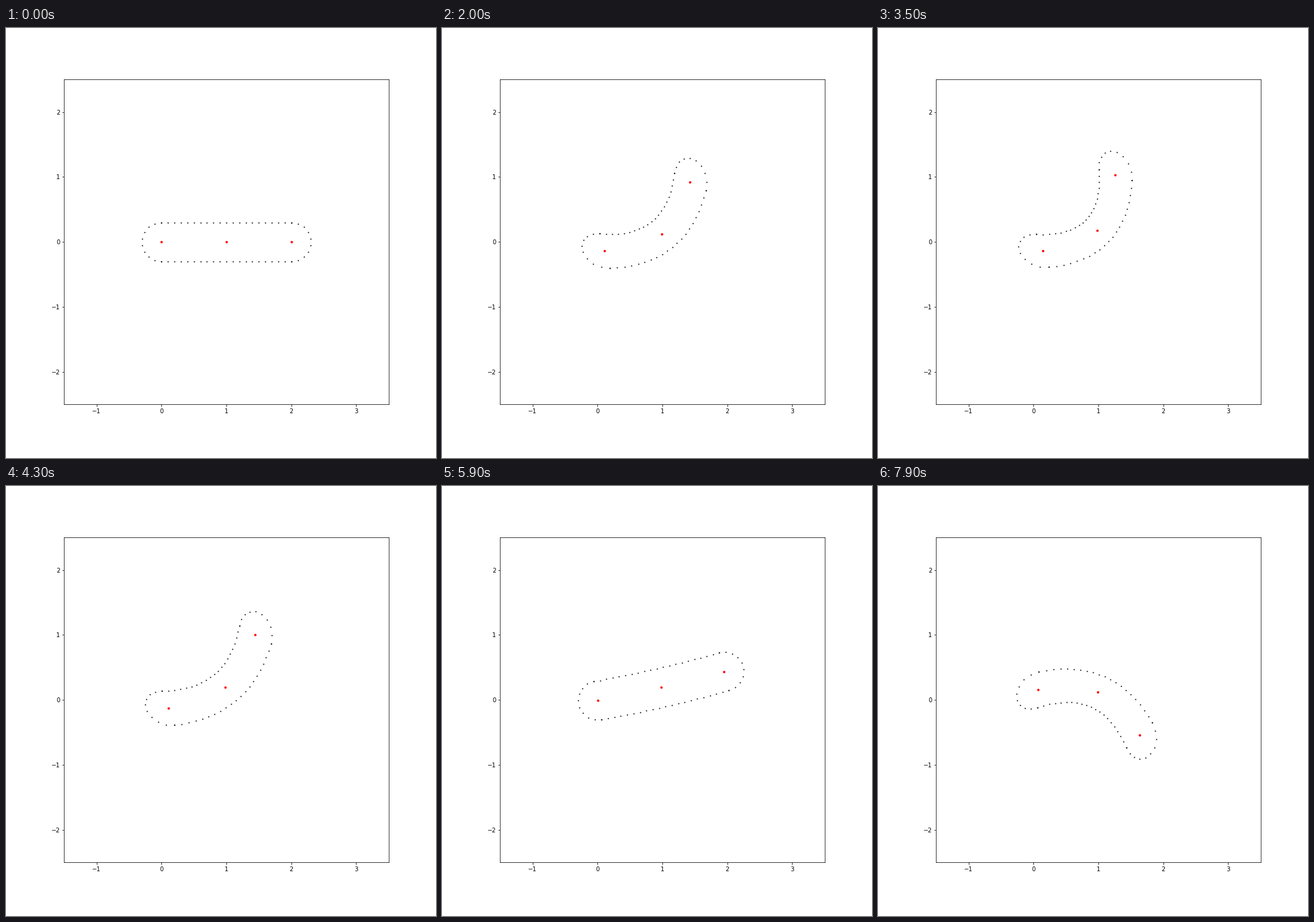
A matplotlib script for the animation above (8000 ms loop, 720 by 720 pixels).

```python
import numpy as np
import matplotlib.pyplot as plt
from matplotlib.animation import FuncAnimation

FRAMES = 80
INTERVAL = 100
RADIUS = 0.3

fig = plt.figure(figsize=(10, 10), dpi=72, facecolor="white")
ax = fig.add_axes([0.135, 0.125, 0.755, 0.755])
ax.set_xlim(-1.5, 3.5)
ax.set_ylim(-2.5, 2.5)
ax.set_xticks(range(-1, 4))
ax.set_yticks(range(-2, 3))


def capsule():
    """Rest outline as complex numbers: two sides and two round caps."""
    side = np.linspace(0, 2, 21)
    cap = RADIUS * np.exp(1j * np.linspace(np.pi / 2, 3 * np.pi / 2, 10))
    return np.concatenate([side + 1j * RADIUS, side - 1j * RADIUS, cap, 2 - cap])


def bend(z, shoulder, elbow):
    """Linear blend skinning: root joint at 0, second joint at 1."""
    weight = (z.real + 0.5) / 3
    return np.exp(1j * shoulder) * (z + weight * (np.exp(1j * elbow) - 1) * (z - 1))


skin = capsule()
joints = np.array([0, 1, 2], dtype=complex)
skin_dots, = ax.plot([], [], "k.", markersize=2)
joint_dots, = ax.plot([], [], "r.", markersize=6)


def update(n):
    shoulder = 0.2 * np.sin(2 * np.pi * n / 200)
    elbow = 1.3 * np.sin(2 * np.pi * n / 120)
    for dots, rest in ((skin_dots, skin), (joint_dots, joints)):
        z = bend(rest, shoulder, elbow)
        dots.set_data(z.real, z.imag)
    return skin_dots, joint_dots


anim = FuncAnimation(fig, update, frames=FRAMES, interval=INTERVAL,
                     repeat=True, repeat_delay=0)
plt.show()
```
